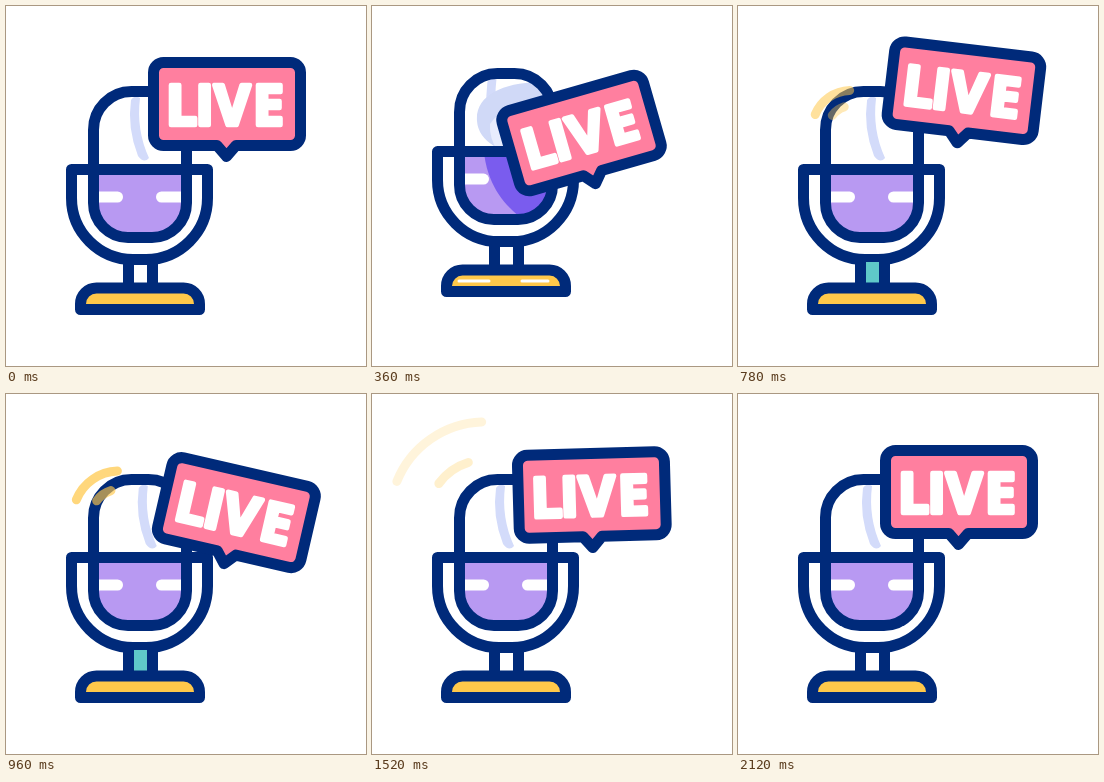
An HTML page for the animation above (2400 ms loop, 360 px wide and 360 px high).

```html
<!DOCTYPE html>
<html lang="en">
<head>
<meta charset="utf-8">
<title>Live microphone</title>
<style>
html, body { margin: 0; width: 100%; height: 100%; overflow: hidden; background: #fff; }
svg { display: block; width: 100vw; height: 100vh; }
.line { stroke: #002a7a; stroke-width: 11; stroke-linejoin: round; }
.wave { fill: none; stroke: #ffc84a; stroke-width: 9; stroke-linecap: round; }
.dash { fill: none; stroke: #fff; stroke-linecap: round; }
text {
  font: 700 55px "Open Sans", "Noto Sans", sans-serif; text-anchor: middle;
  fill: #fff; stroke: #fff; stroke-width: 4.5; stroke-linejoin: round;
}
</style>
</head>
<body>
<svg viewBox="0 0 360 360">
  <defs>
    <path id="body" d="M87.5 124a38 38 0 0 1 38-38.5h17a38 38 0 0 1 38 38.5V197a34.5 34.5 0 0 1-34.5 34.5h-24A34.5 34.5 0 0 1 87.5 197Z"/>
    <clipPath id="inside"><use href="#body"/></clipPath>
  </defs>
  <g id="mic">
    <path class="line" fill="#fff" d="M65.5 163.5V192a61.5 61.5 0 0 0 61.5 61.5h13A61.5 61.5 0 0 0 201.5 192V163.5Z"/>
    <path id="stem" fill="#5fc9c9" d="M128 256h13v24h-13Z"/>
    <path class="line" fill="none" d="M122.5 255V281M146.5 255V281"/>
    <path class="line" fill="#ffc84a" d="M74.5 303.5V298a16 16 0 0 1 16-16H177.500a16 16 0 0 1 16 16V303.5Z"/>
    <use href="#body" fill="#fff"/>
    <g clip-path="url(#inside)">
      <path id="glint" fill="#d3dbfa" d="M125 94Q129 88 134 92Q130 124 143 152Q138 158 132 150Q121 122 125 94Z"/>
      <path fill="#b899f2" d="M87 164h94v70H87Z"/>
      <g id="shade">
        <path fill="#d0d9f7" d="M105 133C103 108 130 95 166 94L182 120L140 158H122Q106 148 105 133Z"/>
        <path fill="#e8ecfd" d="M118 136Q130 116 180 112V164H126Q117 150 118 136Z"/>
        <path fill="#7a5cee" d="M112 164C115 194 130 215 147 228H182V164Z"/>
      </g>
      <path class="dash" stroke-width="11" d="M88 191H111.500"/>
      <path id="rightDash" class="dash" stroke-width="11" d="M155.500 191H182"/>
    </g>
    <use href="#body" class="line" fill="none"/>
    <path class="line" d="M65.5 163.5H201.5"/>
    <path id="shine" class="dash" stroke-width="3" d="M87 293H117M150 293H176"/>
  </g>
  <path id="outer" class="wave"/>
  <path id="inner" class="wave"/>
  <g id="bubble">
    <path class="line" fill="#ff7f9f" d="M157.500 56.500H284.500a10 10 0 0 1 10 10V129.500a10 10 0 0 1-10 10H230L220.500 150.500L211 139.500H157.500a10 10 0 0 1-10-10V66.500a10 10 0 0 1 10-10Z"/>
    <text x="175.500 198.500 226 262.500" y="118.700">LIVE</text>
  </g>
</svg>
<script>
const LOOP = 2400;
const el = id => document.getElementById(id);

// Keys are [time, value] pairs, eased smoothly from one to the next.
const tilt = [[20, 0], [360, -16], [960, 13], [1300, -7.5], [1740, 4.2], [2120, 0]];
const drop = [[20, 0], [350, 27], [720, -20], [960, 19], [1300, -1], [1740, 7], [2120, 0]];
const jump = [[20, 0], [350, -18], [680, 0]];
const shade = [[140, 0], [300, 1], [400, 1], [540, 0]];
const teal = [[500, 0], [660, 1], [1000, 1], [1160, 0]];
const radius = [[540, 27], [960, 46], [1300, 79], [1660, 103]];
const outerFade = [[540, 0], [900, .72], [1000, .72], [1300, .53], [1680, 0]];
const innerFade = [[540, 0], [960, .65], [1300, .72], [1680, 0]];

function at(keys, t) {
  const i = keys.findIndex(k => k[0] > t);
  if (i < 0) return keys[keys.length - 1][1];
  if (i === 0) return keys[0][1];
  const [t0, a] = keys[i - 1], [t1, b] = keys[i];
  const u = (t - t0) / (t1 - t0);
  return a + (b - a) * u * u * (3 - 2 * u);
}

// Arc up and to the left of the microphone head, angles in degrees.
function drawWave(id, r, from, to, alpha) {
  const point = deg => {
    const a = deg * Math.PI / 180;
    return `${113 - r * Math.cos(a)} ${123 - r * Math.sin(a)}`;
  };
  el(id).setAttribute("d", `M${point(from)}A${r} ${r} 0 0 1 ${point(to)}`);
  el(id).setAttribute("opacity", alpha);
}

function draw(now) {
  const t = now % LOOP;
  const angle = at(tilt, t), r = at(radius, t), dark = at(shade, t);
  el("mic").setAttribute("transform", `translate(0 ${at(jump, t)})`);
  el("bubble").setAttribute("transform",
    `translate(${-.3 * angle} ${at(drop, t)}) rotate(${angle} 220.5 157)`);
  el("glint").setAttribute("transform", `translate(${.6 * angle} 0)`);
  el("shade").setAttribute("opacity", dark);
  el("shine").setAttribute("opacity", dark);
  el("rightDash").setAttribute("opacity", 1 - dark);
  el("stem").setAttribute("opacity", at(teal, t));
  drawWave("outer", r, 22, 88, at(outerFade, t));
  drawWave("inner", r * .6, 36, 73, at(innerFade, t));
}

const start = performance.now();
function tick() {
  draw(performance.now() - start);
  requestAnimationFrame(tick);
}
tick();
</script>
</body>
</html>
```
